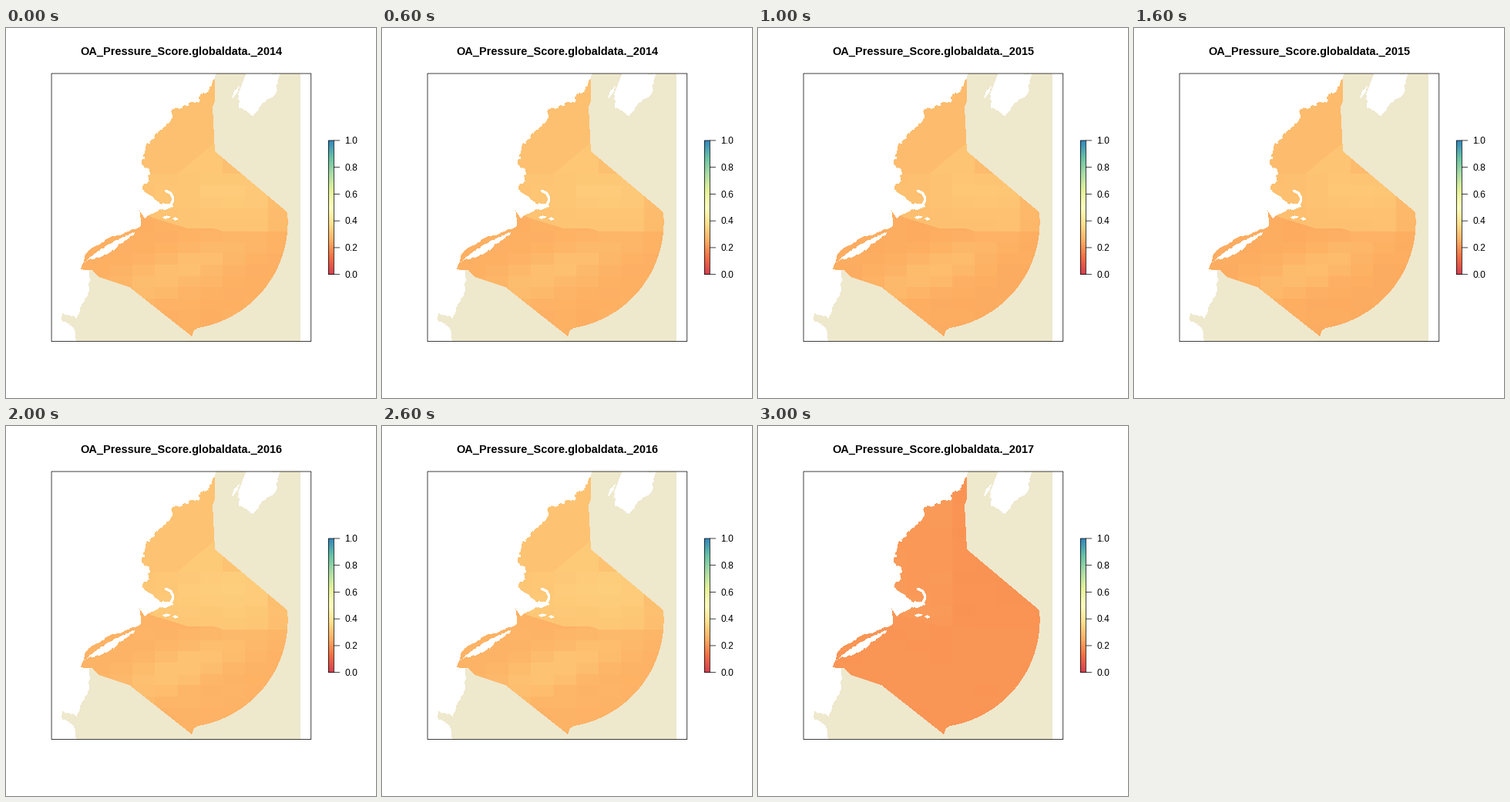
A matplotlib script that plays this animation: 480 by 480 pixels, repeating every 4 s.

```python
import numpy as np
import matplotlib.pyplot as plt
from matplotlib.animation import FuncAnimation
from matplotlib.colors import LinearSegmentedColormap
from matplotlib.path import Path
from matplotlib.patches import Rectangle

SIZE = 480
YEARS = (2014, 2015, 2016, 2017)
SHIFT = (0, -0.009, 0.008, 0)
BEIGE = np.array((238, 232, 205)) / 255
SPECTRAL = LinearSegmentedColormap.from_list("score", [
    "#D53E4F", "#F46D43", "#FDAE61", "#FEE08B", "#FFFFBF",
    "#E6F598", "#ABDDA4", "#66C2A5", "#3288BD"], N=512)

plt.rcParams["font.family"] = "Liberation Sans"
rng = np.random.default_rng(8)
Y, X = np.mgrid[0:SIZE, 0:SIZE] + 0.5
PIXELS = np.column_stack([X.ravel(), Y.ravel()])


def rough(points, amp):
    """Turn a coarse line into a fractal coast by midpoint displacement."""
    pts = np.array(points, float)
    for _ in range(5):
        step = np.diff(pts, axis=0)
        normal = np.clip(step[:, ::-1] * (-1, 1), -8, 8)
        mid = pts[:-1] + step / 2 + normal * rng.uniform(-amp, amp, (len(step), 1))
        joined = np.empty((len(pts) + len(mid), 2))
        joined[::2], joined[1::2] = pts, mid
        pts = joined
    return [tuple(p) for p in pts]


def mask(points):
    return Path(points).contains_points(PIXELS).reshape(SIZE, SIZE)


def sliver(a, b, width):
    """Ragged lens-shaped island between two points."""
    a, b = np.array(a), np.array(b)
    t = np.linspace(0, 1, 7)[:, None]
    across = (b - a)[::-1] * (-1, 1) / np.hypot(*(b - a))
    bulge = width * np.sin(np.pi * t) * across
    line = a + (b - a) * t
    return mask(rough([*(line + bulge), *(line - bulge)[::-1]], 0.25))


# Scored waters: a straight-sided wedge closed by a circular arc and the coast.
angle = np.radians(np.linspace(-5.3, 80.7, 40))
arc = np.column_stack([226.6 + 139 * np.cos(angle), 251.8 + 139 * np.sin(angle)])
limit = [(271, 70), (271, 95), (268, 102), (271, 160), *arc,
         (244, 392), (241, 400), (160, 336), (121, 323), (111, 314)]
south_coast = rough([(111, 314), (97, 313), (104, 292), (130, 274), (175, 257),
                     (173, 237), (180, 247), (206, 232), (190, 218), (178, 210)], 0.12)
north_coast = rough([(178, 210), (187, 189), (176, 177), (182, 152), (193, 138),
                     (214, 119), (220, 102), (251, 95), (266, 75), (271, 66)], 0.42)
scored = mask(limit + south_coast + north_coast)

lower_coast = rough([(91, 406), (88, 389), (73, 381), (73, 370), (92, 378),
                     (106, 346), (108, 314)], 0.2)
sea = mask([(272, 59), (382, 59), (382, 407), *lower_coast,
            (160, 325), (260, 200), (271, 66)])

land = mask(rough([(312, 58), (354, 58), (351, 84), (336, 96), (321, 114),
                   (303, 104), (301, 86)], 0.2))
land |= sliver((102, 304), (160, 271), 5) | sliver((135, 284), (168, 265), 3)
land |= sliver((190, 232), (218, 231), 4)
land |= sliver((202, 246), (214, 245), 2) | sliver((216, 247), (224, 248), 2)
land |= sliver((293, 92), (303, 75), 2)
land |= (abs(np.hypot(X - 206, Y - 222) - 10.5) < 1.8) & (X > 206)

# Scores are constant inside coarse cells, apart from a few sharp fronts.
COL_W, ROW_H = 29.2, 14.7
col = np.floor((X - 281) / COL_W).astype(int)
row = np.floor((Y - 189.5) / ROW_H).astype(int)
cx, cy = 281 + (col + 0.5) * COL_W, 189.5 + (row + 0.5) * ROW_H
upper = Y < np.interp(X, (170, 190, 236, 270, 281), (235, 246, 260, 260, 264))
calm = Y < 189.5
wedge = calm & (X < 281) & (X - 222 > 1.2 * (189.5 - Y))


def bell(distance, spread):
    return np.exp(-(distance / spread) ** 2)


north = 0.296 + 0.018 * wedge + np.where(
    calm, 0, 0.008 + 0.02 * bell(cx - 290, 60) * bell(cy - 212, 28))
north -= 0.02 * (X > 340)
ridge = bell(cy - 334 + 0.4 * (cx - 180), 28) * bell(cx - 225, 95)
field = np.where(upper, north, 0.256 + 0.042 * ridge)
late = 0.204 + np.where(upper, np.where(X < 252, 0.009, -0.003), 0)


def scores(index):
    jitter = np.random.default_rng(20 + index).uniform(-1, 1, (40, 40))[row + 15, col + 12]
    if YEARS[index] == 2017:
        return late + 0.0015 * jitter
    return field + SHIFT[index] + np.where(calm, 0, 0.003) * jitter


def picture(index):
    rgb = np.ones((SIZE, SIZE, 3))
    rgb[sea] = BEIGE
    rgb[scored] = SPECTRAL(scores(index))[scored][:, :3]
    rgb[land] = 1
    return rgb


pictures = [picture(i) for i in range(len(YEARS))]

fig = plt.figure(figsize=(SIZE / 72, SIZE / 72), dpi=72, facecolor="white")
ax = fig.add_axes([0, 0, 1, 1])
raster = ax.imshow(pictures[0], extent=(0, SIZE, SIZE, 0),
                   interpolation="nearest", aspect="auto")

LEFT, TOP, RIGHT, BOTTOM = 59.04, 59.04, 395.76, 406.56
BAR_L, BAR_R = 418.4, 425.4
HIGH, LOW = TOP + (BOTTOM - TOP) / 4, BOTTOM - (BOTTOM - TOP) / 4
LINE = dict(lw=0.75, snap=False)
ax.imshow(np.linspace(1, 0, 174)[:, None], cmap=SPECTRAL, vmin=0, vmax=1,
          extent=(BAR_L, BAR_R, LOW, HIGH), interpolation="nearest", aspect="auto")
ax.set(xlim=(0, SIZE), ylim=(SIZE, 0))
ax.axis("off")

for x0, y0, x1, y1 in ((LEFT, TOP, RIGHT, BOTTOM), (BAR_L, HIGH, BAR_R, LOW)):
    ax.add_patch(Rectangle((x0, y0), x1 - x0, y1 - y0, fill=False, ec="black", **LINE))
for value in np.linspace(0, 1, 6):
    y = LOW + (HIGH - LOW) * value
    ax.plot([BAR_R, BAR_R + 7.2], [y, y], color="black", **LINE)
    ax.text(439, y + 4.3, f"{value:.1f}", fontsize=12, va="baseline")
title = ax.text((LEFT + RIGHT) / 2, 35, "", fontsize=14.5, weight="bold",
                ha="center", va="baseline")


def update(index):
    raster.set_data(pictures[index])
    title.set_text(f"OA_Pressure_Score.globaldata._{YEARS[index]}")
    return raster, title


anim = FuncAnimation(fig, update, frames=len(YEARS), interval=1000,
                     repeat=True, repeat_delay=0)
plt.show()
```
